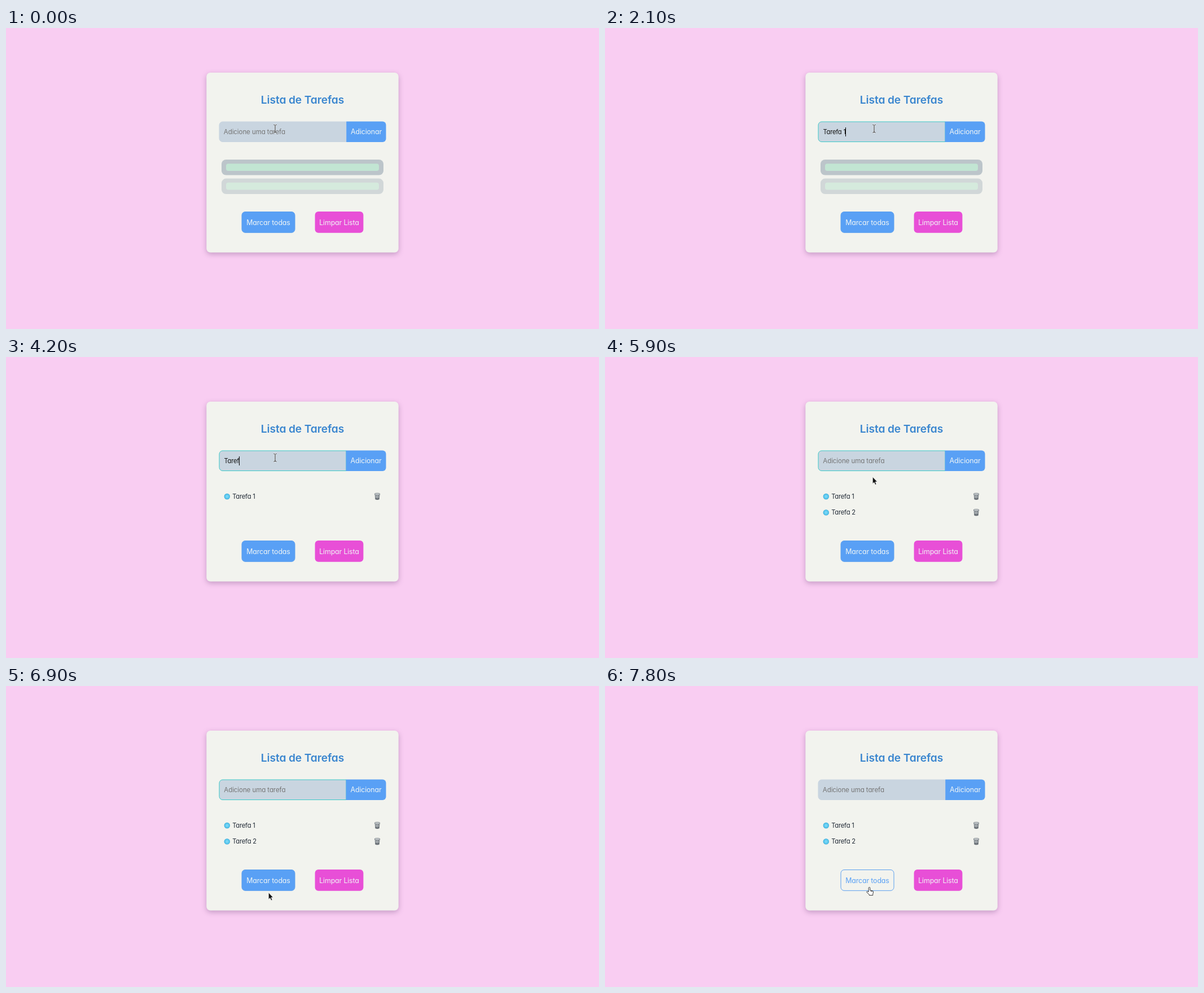
An HTML page that plays this animation: 1051 px wide and 533 px high, repeating every 8 s.

```html
<!DOCTYPE html>
<html lang="pt">
<head>
<meta charset="utf-8">
<title>Lista de Tarefas</title>
<style>
  html, body { margin: 0; width: 100%; height: 100%; overflow: hidden; background: #f9cdf2; }
  svg { display: block; width: 1051px; height: 533px; }
  text {
    font-family: Poppins, Inter, "Open Sans", sans-serif;
    font-feature-settings: "cv11";
    white-space: pre;
  }
  .title { font-size: 19.2px; font-weight: 600; letter-spacing: -.006em; fill: #3a86cf; text-anchor: middle; }
  .label { font-size: 12.4px; letter-spacing: -.012em; fill: #f0f5f5; text-anchor: middle; }
  .hint { font-size: 11.6px; letter-spacing: -.01em; fill: #757575; }
  .entry { font-size: 11.2px; letter-spacing: -.02em; fill: #111; }
  .entry.item { fill: #212a36; }
  .card { filter: drop-shadow(0 3px 5px rgba(60, 20, 80, .28)); }
</style>
</head>
<body>
<svg viewBox="0 0 1051 533">
  <defs>
    <radialGradient id="bead">
      <stop offset="0" stop-color="#8bdcf6"/>
      <stop offset=".55" stop-color="#5fcbf1"/>
      <stop offset=".78" stop-color="#55c4ec"/>
      <stop offset="1" stop-color="#2b9fd0"/>
    </radialGradient>
    <linearGradient id="metal">
      <stop offset="0" stop-color="#8d9499"/>
      <stop offset=".5" stop-color="#c6cbce"/>
      <stop offset="1" stop-color="#7b8287"/>
    </linearGradient>
    <g id="bin">
      <path d="M-4.7-4.3 L-3.5 5 Q0 6.8 3.5 5 L4.7-4.3Z" fill="url(#metal)"/>
      <path d="M-3-3 L2.8 4.5 M0-3 L3.4 1.3 M-4 0 L.6 5.4 M3-3 L-2.8 4.5 M0-3 L-3.5 1.3 M4 0 L-.6 5.4" stroke="#62696e" stroke-width=".5" fill="none"/>
      <path d="M-3.9 2.2 L-3.5 5 Q0 6.8 3.5 5 L3.9 2.2 Q0 3.6-3.9 2.2Z" fill="#596067" opacity=".75"/>
      <ellipse cy="-4.3" rx="5" ry="1.5" fill="#dde1e3" stroke="#687076" stroke-width=".9"/>
    </g>
    <g id="slot">
      <rect x="382" width="287" height="27.5" rx="8" fill="#bcc5ca"/>
      <rect x="390" y="7.2" width="271" height="12.8" rx="4" fill="#c2e5d3"/>
    </g>
  </defs>

  <rect width="1051" height="533" fill="#f9cdf2"/>
  <rect class="card" x="355.3" y="79" width="340.4" height="318.5" rx="7" fill="#f2f3ee"/>
  <text class="title" x="525.5" y="134">Lista de Tarefas</text>

  <path id="field" d="M603 166H384a6 6 0 0 0-6 6V195.5a6 6 0 0 0 6 6H603Z" fill="#c9d5e0"/>
  <path id="add" fill="#59a0f5"/>
  <text id="addLabel" class="label" y="188.3">Adicionar</text>
  <text id="hint" class="hint" y="187.6">Adicione uma tarefa</text>
  <text id="typed" class="entry" x="386.4" y="187.8"></text>
  <rect id="caret" y="176" width="1" height="16" fill="#000"/>

  <g id="slots">
    <use href="#slot" y="233"/>
    <use href="#slot" y="266.6" opacity=".6"/>
  </g>
  <g id="items"></g>

  <rect id="mark" x="418" y="325.5" width="94" height="36.8" rx="6" fill="#59a0f5" stroke="#5b9fee"/>
  <text id="markLabel" class="label" x="465" y="348.5">Marcar todas</text>
  <rect x="547.6" y="325" width="85.8" height="37.7" rx="6" fill="#e84fd7"/>
  <text class="label" x="590.5" y="348.5">Limpar Lista</text>

  <g id="pointer">
    <g id="beam" fill="none">
      <path d="M-2.5 .5H-1L0 1.5 1 .5H2.5M-2.5 14H-1L0 13 1 14H2.5M0 1.5V13" stroke="#fff" stroke-width="2.4" opacity=".7"/>
      <path d="M-2.5 .5H-1L0 1.5 1 .5H2.5M-2.5 14H-1L0 13 1 14H2.5M0 1.5V13" stroke="#222"/>
    </g>
    <path id="arrow" d="M.3 .3V12.4L3 9.9 5 14.3 7 13.4 5.1 9.1H8.6Z" fill="#111" stroke="#fff" stroke-width=".7"/>
    <path id="hand" d="M4.2 8.6V1.7a1.3 1.3 0 0 1 2.6 0V5.8L11 6.7a2 2 0 0 1 1.6 2.2L11.7 12.5V14.6H5.3V13.2L.9 9.3C.3 8 1.8 7.2 2.7 8ZM8.4 6.2V8.2M10.2 6.6V8.4" fill="#fff" stroke="#222" stroke-width=".9" stroke-linejoin="round"/>
  </g>
</svg>
<script>
const $ = id => document.getElementById(id);
const LOOP = 8000;

const typing = [
  [0, ""], [1200, "T"], [1500, "Ta"], [1600, "Tar"], [1700, "Taref"],
  [1900, "Tarefa"], [2000, "Tarefa "], [2100, "Tarefa 1"], [2600, ""],
  [3700, "T"], [4000, "Tar"], [4200, "Taref"], [4400, "Tarefa"],
  [4500, "Tarefa "], [4800, "Tarefa 2"], [5300, ""]
];
const caretStates = [
  [0, false], [600, true], [3300, false], [3700, true],
  [5900, false], [6300, true], [6800, false]
];
const pointerPath = [
  [0, "beam", 477, 171], [5900, "arrow", 474, 212], [6000, "arrow", 470, 290],
  [6100, "hand", 460, 345], [6200, "arrow", 465, 372], [6300, "arrow", 465, 378],
  [6600, "arrow", 465, 376], [6700, "arrow", 465, 372], [6800, "arrow", 465, 368],
  [6900, "arrow", 465, 365.5], [7500, "hand", 463, 359], [7600, "hand", 463, 358],
  [7700, "hand", 463, 357], [7800, "hand", 463, 356]
];
const hoverFade = [
  [0, 0], [6100, .22], [6200, .45], [6300, .08], [6400, 0],
  [7500, .22], [7600, .6], [7700, .9], [7800, 1]
];

const latest = (steps, t) => steps.findLast(step => step[0] <= t).slice(1);
const show = (node, on) => node.setAttribute("display", on ? "inline" : "none");
const set = (node, attrs) => {
  for (const key in attrs) node.setAttribute(key, attrs[key]);
};
const mix = (a, b, p) => `rgb(${a.map((v, i) => Math.round(v + (b[i] - v) * p))})`;

$("items").innerHTML = [1, 2].map(n => {
  const y = 247 + (n - 1) * 28.4;
  return `<g><circle cx="391.8" cy="${y}" r="5.2" fill="url(#bead)"/>
    <text class="entry item" x="401.2" y="${y + 3.8}">Tarefa ${n}</text>
    <use href="#bin" x="658" y="${y}"/></g>`;
}).join("");

function draw(t) {
  const focused = t >= 600 && t < 7100;
  const shift = focused ? .5 : 0;
  set($("field"), { stroke: focused ? "#3cc8c8" : "#c9d5e0" });
  set($("add"), { d: `M${603.2 - shift} 165.5H667.5a6 6 0 0 1 6 6V196a6 6 0 0 1-6 6H${603.2 - shift}Z` });
  set($("addLabel"), { x: 638.5 - shift });

  const [text] = latest(typing, t);
  $("typed").textContent = text;
  show($("hint"), !text);
  set($("hint"), { x: 385.8 + shift });
  show($("caret"), focused && latest(caretStates, t)[0]);
  set($("caret"), { x: text ? Math.round(386 + $("typed").getComputedTextLength()) : 386 });

  show($("slots"), t < 2600);
  const [first, second] = $("items").children;
  show(first, t >= 2600);
  show(second, t >= 5300);

  const [fade] = latest(hoverFade, t);
  set($("mark"), { "fill-opacity": 1 - fade });
  $("markLabel").style.fill = mix([240, 245, 245], [89, 160, 245], fade);

  const [kind, x, y] = latest(pointerPath, t);
  for (const shape of $("pointer").children) show(shape, shape.id === kind);
  set($("pointer"), { transform: `translate(${x} ${y})` });
}

const start = performance.now();
function tick() {
  draw((performance.now() - start) % LOOP);
  requestAnimationFrame(tick);
}
tick();
</script>
</body>
</html>
```
